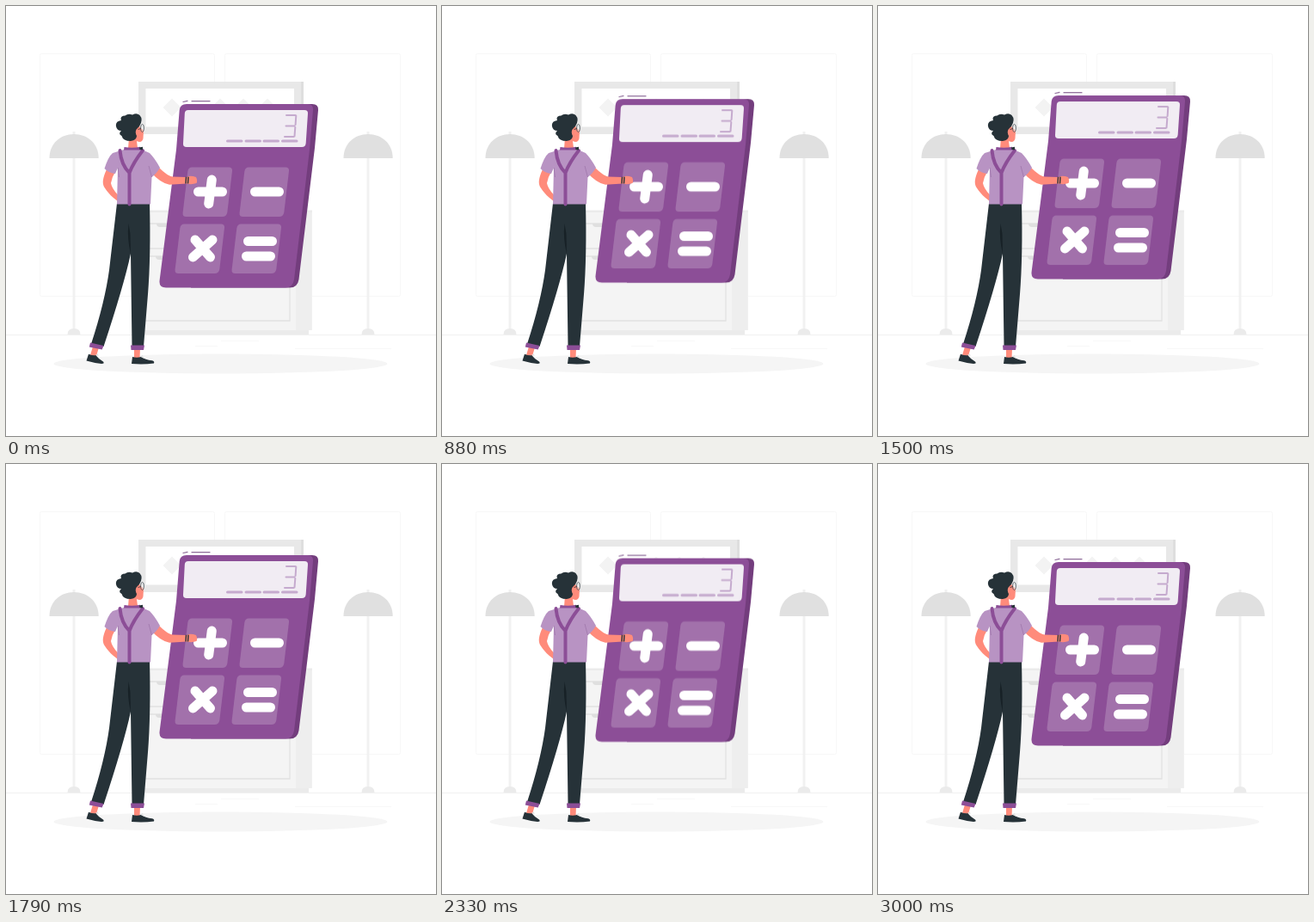
These frames come from a looping animation (500x500 px, 3040 ms). An HTML page:

```html
<!DOCTYPE html>
<html lang="en">
<head>
<meta charset="utf-8">
<title>Calculator</title>
<style>
  html, body { margin: 0; width: 100%; height: 100%; overflow: hidden; background: #fff; }
  svg { display: block; width: 100vw; height: 100vh; }
  .calc { animation: float 3040ms linear infinite; }
  /* 1.5 s up, 1.5 s down, short rest */
  @keyframes float {
    0%, 98.684%, 100% { transform: translateY(0); }
    49.342% { transform: translateY(-10px); }
  }
  .line { fill: none; stroke-linecap: round; stroke-linejoin: round; }
  .skin { fill: #ff8b7b; }
  .dark { fill: #263238; }
  .purple { fill: #8c4e97; }
  .shirt { fill: #b893c3; }
</style>
</head>
<body>
<svg viewBox="0 0 500 500">
  <defs>
    <path id="key" d="M10.500 0H53Q57.500 0 57 4.500L51.300 52.500Q50.500 57.500 45.500 57.500H3.500Q-.900 57.500-.400 53L5.300 5Q6 0 10.500 0Z"/>
    <path id="diamond" d="M0-10.500 10.500 0 0 10.500-10.500 0Z" fill="#f3f3f3"/>
    <g id="lamp">
      <rect x="-1.500" y="146" width="3" height="232" fill="#f1f1f1"/>
      <path d="M-28.500 177C-28.500 160-16 149 0 149S28.700 160 28.700 177Z" fill="#e0e0e0"/>
      <path d="M-7.500 382Q-7.500 375 0 375T7.500 382Z" fill="#ebebeb"/>
    </g>
  </defs>

  <!-- room -->
  <g fill="none" stroke="#f7f7f7">
    <rect x="39.500" y="55.500" width="203" height="282" rx="2"/>
    <rect x="254.500" y="55.500" width="204" height="282" rx="2"/>
  </g>
  <path d="M0 382.500H500" stroke="#f1f1f1"/>
  <path d="M220 395.500H246M250 389.500H294M336 398.500H448" stroke="#f8f8f8"/>
  <rect x="154" y="88" width="192" height="61" fill="#e8e8e8"/>
  <path d="M343 88h3v61h-3Z" fill="#dedede"/>
  <rect x="162.500" y="96" width="172.500" height="44.500" fill="#fff"/>
  <use href="#diamond" x="193" y="118"/>
  <use href="#diamond" x="249" y="118"/>
  <use href="#diamond" x="276" y="118"/>
  <use href="#diamond" x="304" y="118"/>
  <use href="#lamp" x="79"/>
  <use href="#lamp" x="421"/>

  <!-- cabinet -->
  <rect x="152" y="238" width="204" height="139" fill="#f4f4f4"/>
  <rect x="337" y="238" width="18.500" height="139" fill="#eee"/>
  <path d="M152 237.500H356V240H152Z" fill="#ebebeb"/>
  <rect x="154" y="377" width="198" height="5" fill="#ebebeb"/>
  <path d="M156 253H330V282H156ZM156 291H330V366H156Z" fill="none" stroke="#e2e2e2" stroke-width="1.300"/>
  <path d="M175 253H192V257H179Q175 257 175 253ZM174 291H192V295H178Q174 295 174 291Z" fill="#dfdfdf"/>

  <ellipse cx="249.500" cy="416" rx="194" ry="11.500" fill="#f5f5f5"/>

  <!-- calculator -->
  <g class="calc">
    <path d="M206 111.500 211 110.400M216 110.700H237" class="line" stroke="#8d6a98" stroke-width="1.200"/>
    <path d="M210 114H356Q363.500 114 363 121L359 165 340.500 318Q339 327.500 330 327.500H215L230 114Z" fill="#733d7d"/>
    <path class="purple" d="M210 114H351Q357.500 114 357 121L353 167 335 318Q333.500 327.500 325 327.500H186Q177.500 327.500 178.600 319L198 167 201.700 121Q202.500 114 210 114Z"/>
    <path d="M212 121H347Q351.300 121 351 125L348.700 159.500Q348.300 164 344 164H210Q205.700 164 206 160L207.800 125Q208 121 212 121Z" fill="#f1ecf3"/>
    <g class="line" stroke="#c5aace" stroke-linecap="butt">
      <path d="M257.500 157H274M279 157H295.500M300 157H316.500M321.500 157H338" stroke-width="3" stroke-linecap="round"/>
      <path d="M326 127H336.500M325.500 139.500H335.500M324 152H334.500M337.300 127.500 336.600 138M336.300 141 335.500 151.500" stroke-width="2"/>
    </g>
    <g fill="#a271ab">
      <use href="#key" x="206" y="187.500"/>
      <use href="#key" x="272" y="187.500"/>
      <use href="#key" x="197" y="253.500"/>
      <use href="#key" x="263" y="253.500"/>
    </g>
    <path class="line" stroke="#fff" stroke-width="11" d="M223.500 216H251.500M239.300 202 235.700 230M289.500 216H317.500M220 272 237.500 292M240 272 217.500 292M281.500 273.500H309.500M279.500 291H307.500"/>
  </g>

  <!-- man: legs -->
  <path class="skin" d="M101 396 98 406 105 407 108 397ZM149 398V410H155.500L156 398Z"/>
  <path class="dark" d="M96 404.800Q100 406.500 104.500 406.300Q108 411 113 413.500Q115 416 111 416Q102 415 93.500 412.500ZM147 408Q152 409.500 157 408Q162 411.500 170 412.300Q173 413 172 415.500Q160 417 146 416Z"/>
  <path d="M104 405.500 107 404.500 107.500 407.500ZM156 407.500 159 406 160 409.500Z" fill="#e0e0e0"/>
  <path class="dark" d="M129 229.500H167Q168.500 290 165 335L160 396H146.500L145 288Q137 325 113.500 396L99 393Q115 344 120 307Z"/>
  <path d="M142.500 253Q140.500 270 145 288L144.500 265Z" fill="#172126"/>
  <path class="purple" d="M98 391.500 113.500 395 111.700 399.500 96.800 396.500ZM145 394.500H161L160 400H145.500Z"/>

  <!-- arms -->
  <path class="skin" d="M117 190Q110 205 114.500 211Q120 220 130 227V219.500Q123 212 122 206Q123 199 127 193ZM166 193 178 188Q188 198 194 198.500L210 199Q214 196.500 221 199Q223 203 221.500 206Q216 208 210 206.500L190 207.800Q180 206 169 194Z"/>
  <path d="M209.500 198.800 209 206.500M212 198.600 211.500 206.500" stroke="#263238" stroke-width="1.400"/>

  <!-- head -->
  <path class="skin" d="M143 153 142 166Q147 169 153 165L152 157Q158 160 159.500 154L160 145 154 139 145 148Z"/>
  <path class="dark" d="M155 140Q160 132 155.500 127Q152 124 147 126.500Q142 124.500 138.500 127.500Q132 128 134 133Q127 134 128 140Q129 145 134 145Q130 149 134.500 151Q136 157 145 157Q152 156 152 151Q149 145 153 142Z"/>
  <path d="M153.500 143.500 157 142.500" stroke="#263238" stroke-width=".8"/>
  <ellipse cx="158.500" cy="142" rx="1.900" ry="4.500" fill="#fff" fill-opacity=".4" stroke="#263238" stroke-width=".7"/>

  <!-- shirt -->
  <path class="shirt" d="M137 167 124 171Q119 175 114.500 189Q119 194 127 195L130 188 129 230.500H168L169.500 199Q175 195 179 188Q173 177 167 171L158 167Z"/>
  <path d="M130 188 131.500 199M166 186 169.500 199" stroke="#9e75aa" stroke-width=".8"/>
  <g class="line" stroke="#8c4e97" stroke-width="4" stroke-linecap="butt">
    <path d="M132.500 168Q134 185 143.500 194Q148 182 159 168M143.500 193V230.500"/>
  </g>
  <path class="purple" d="M137.500 164Q147 165.500 156 163.800L157 167.500H137Z"/>
  <path class="dark" d="M155 164.500 159 163.800V167.500L155.500 167Z"/>
</svg>
</body>
</html>
```
